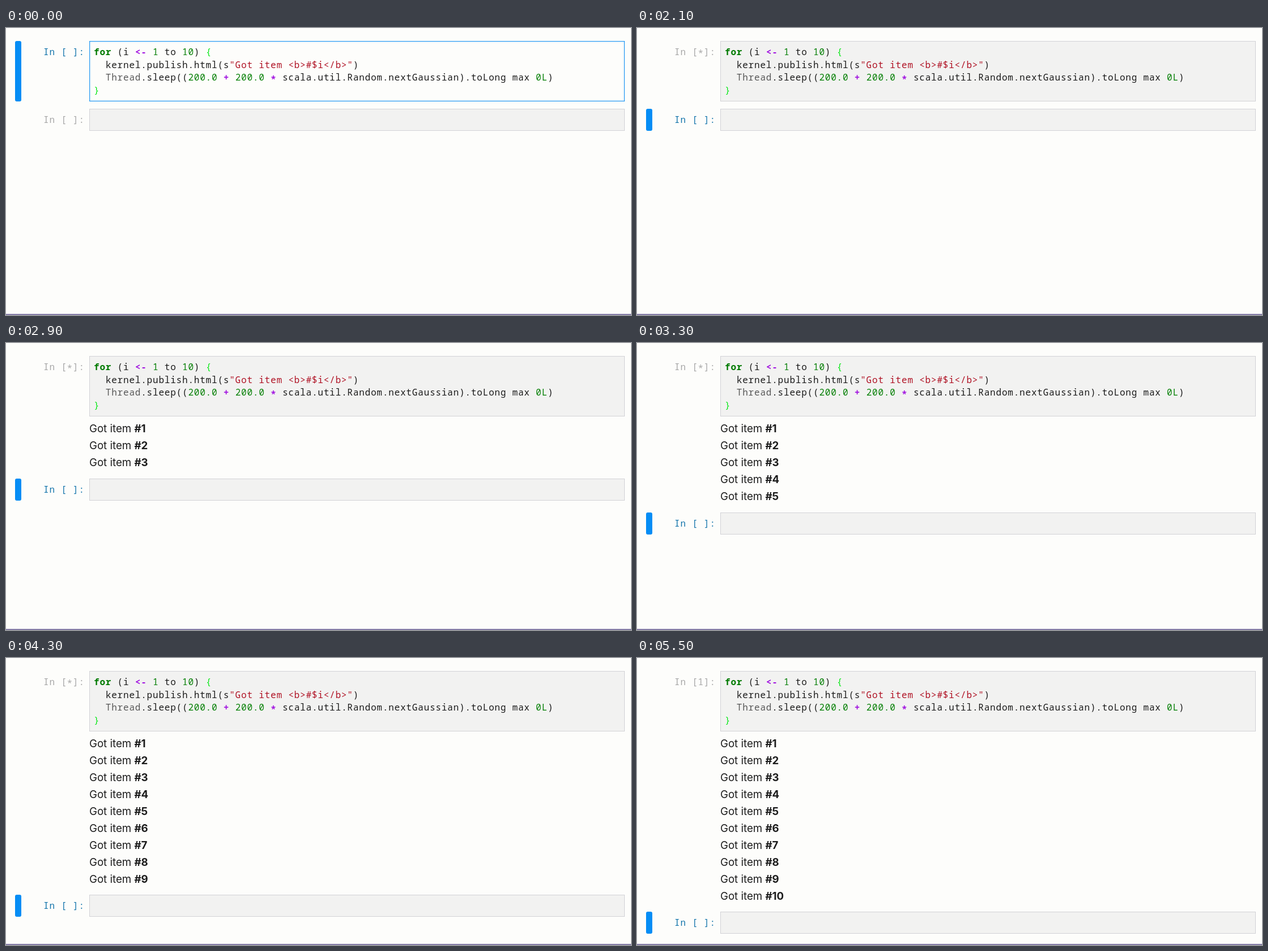
Animation of 1103 by 508 pixels, one loop 5600 ms. Source, as an HTML page:

```html
<!DOCTYPE html>
<html lang="en">
<head>
<meta charset="utf-8">
<title>Notebook output</title>
<style>
  html, body { margin: 0; width: 100%; height: 100%; overflow: hidden; }
  body {
    position: relative; background: #fdfdfb; color: #1c1c1c;
    --loop: 5600ms step-end infinite;
  }
  body::after {
    content: ""; position: absolute; left: 0; bottom: 0;
    width: 100%; height: 2px; background: #857da8;
  }

  .cell { position: relative; height: 39px; }
  .cell:first-child { margin-top: 23px; height: 107px; }
  .bar {
    position: absolute; left: 16px; top: 0; width: 10.5px; height: 100%;
    border-radius: 3px; background: #058df5;
  }
  .prompt, pre {
    margin: 0; white-space: pre;
    font: 16px/22.7px "Noto Sans Mono", monospace; letter-spacing: .8px;
  }
  .prompt { position: absolute; left: 66px; top: 8px; color: #1676ac; }
  .box {
    position: absolute; left: 147px; top: 0; box-sizing: border-box;
    width: 945px; height: 100%;
    border: 1px solid #d2d2d6; background: #f2f2f1;
  }
  pre { position: absolute; left: 155px; top: 8px; }
  .mid { position: relative; top: 3px; }

  .kw { color: #007a00; font-weight: bold; }
  .op { color: #a010e0; font-weight: bold; }
  .num { color: #078007; }
  .str { color: #b01325; }
  .type { color: #585858; }
  .brace { color: #0be81a; }

  #out {
    height: 0; overflow: hidden; padding-left: 147px;
    font: 18.67px/29.95px Inter, sans-serif;
    animation: grow var(--loop);
  }
  #out div:first-child { margin-top: 7px; }
  #out b { font-weight: 700; }
  .next { margin-top: 13px; }

  .idle { animation: idle var(--loop); }
  .active { animation: active var(--loop); }
  .edit {
    border: 1.5px solid #2196f3; background: #fdfdfb;
    box-shadow: inset 0 0 3px #8ecbf8;
    animation: idle var(--loop);
  }
  .dim { color: #a8a8a8; }
  .busy { animation: busy var(--loop); }
  .done { animation: done var(--loop); }

  @keyframes idle { 0% { visibility: visible } 5.35%, to { visibility: hidden } }
  @keyframes active { 0% { visibility: hidden } 5.35%, to { visibility: visible } }
  @keyframes busy {
    0% { visibility: hidden } 5.35% { visibility: visible } 89.28%, to { visibility: hidden }
  }
  @keyframes done { 0% { visibility: hidden } 89.28%, to { visibility: visible } }
  @keyframes grow {
    0% { height: 0 }
    39.28% { height: 36.75px }
    42.85% { height: 66.7px }
    48.21% { height: 96.65px }
    53.57% { height: 126.6px }
    58.92% { height: 156.55px }
    62.49% { height: 186.5px }
    66.07% { height: 216.45px }
    71.42% { height: 246.4px }
    76.78% { height: 276.35px }
    82.14%, to { height: 306.3px }
  }
</style>
</head>
<body>
<div class="cell">
  <div class="bar idle"></div>
  <div class="box"></div>
  <div class="box edit"></div>
  <div class="prompt idle">In [ ]:</div>
  <div class="prompt dim busy">In [<span class="mid">*</span>]:</div>
  <div class="prompt dim done">In [1]:</div>
  <pre><span class="kw">for</span> (i <span class="op">&lt;-</span> <span class="num">1</span> to <span class="num">10</span>) <span class="brace">{</span>
  kernel.publish.html(s<span class="str">"Got item &lt;b&gt;#$i&lt;/b&gt;"</span>)
  <span class="type">Thread</span>.sleep((<span class="num">200.0</span> <span class="op">+</span> <span class="num">200.0</span> <span class="op mid">*</span> scala.util.Random.nextGaussian).toLong max <span class="num">0L</span>)
<span class="brace">}</span></pre>
</div>
<div id="out"></div>
<div class="cell next">
  <div class="bar active"></div>
  <div class="box"></div>
  <div class="prompt dim idle">In [ ]:</div>
  <div class="prompt active">In [ ]:</div>
</div>
<script>
  const out = document.getElementById("out");
  for (let i = 1; i <= 10; i++) out.innerHTML += `<div>Got item <b>#${i}</b></div>`;
</script>
</body>
</html>
```
